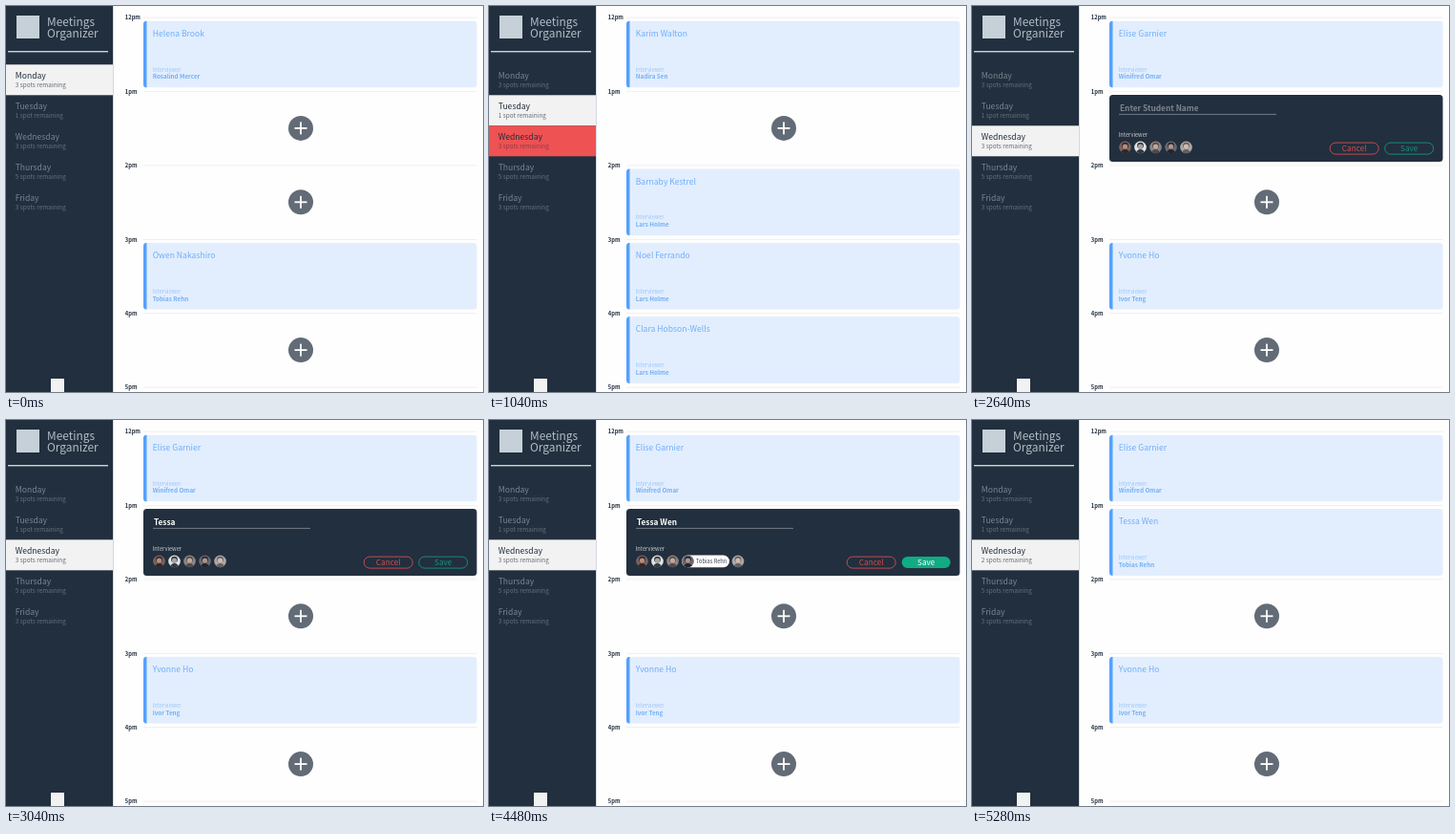
Write an HTML page with a canvas that moves like this. It is 500 px wide and 404 px high and loops after 5840 ms.

```html
<!DOCTYPE html>
<html lang="en">
<head>
<meta charset="utf-8">
<title>Booking schedule</title>
<style>
  html, body { margin: 0; width: 100%; height: 100%; overflow: hidden; background: #fefefe; }
  canvas { display: block; width: 500px; height: 404px; }
</style>
</head>
<body>
<canvas id="stage" width="500" height="404"></canvas>
<script>
const ctx = document.getElementById('stage').getContext('2d');
const LOOP = 5840;
const FONT = '"Noto Sans CJK JP", "Noto Sans CJK SC", "Noto Sans CJK", "Open Sans", sans-serif';
const NAVY = '#222f3e', BLUE = '#54a0ff', RED = '#ee5253', GREEN = '#10ac84';
const ROW = 77.4;

// Times at which the interface changes state.
const AT = {
  hoverTue: 560, openTue: 960, hoverWed: 1040, openWed: 1520,
  hoverAdd: 1920, form: 2320, type: 2640, typed: 3280,
  pick: 4080, hoverSave: 4480, saving: 4640, saved: 5280
};

const DAYS = ['Monday', 'Tuesday', 'Wednesday', 'Thursday', 'Friday'];
const SPOTS = [3, 1, 3, 5, 3];
const HOURS = ['12pm', '1pm', '2pm', '3pm', '4pm', '5pm'];
const STUDENT = 'Tessa Wen', PICKED = 'Tobias Rehn';

// Bookings per day: one [student, interviewer] pair or null per hour.
const BOOKINGS = [
  [['Helena Brook', 'Rosalind Mercer'], null, null, ['Owen Nakashiro', PICKED], null],
  [['Karim Walton', 'Nadira Sen'], null, ['Barnaby Kestrel', 'Lars Holme'],
   ['Noel Ferrando', 'Lars Holme'], ['Clara Hobson-Wells', 'Lars Holme']],
  [['Elise Garnier', 'Winifred Omar'], null, null, ['Yvonne Ho', 'Ivor Teng'], null]
];

// Avatar tones: background, hair and shoulders, skin.
const AVATARS = [
  ['#77635f', '#30262a', '#b78d7b'],
  ['#e4e4e4', '#313a42', '#a9a4a2'],
  ['#8d8580', '#4b4a50', '#c5a797'],
  ['#6a6970', '#20252e', '#b49389'],
  ['#aaa7a5', '#615f63', '#d1b9ae']
];

function text(str, x, y, size, color, weight = 400, align = 'left') {
  ctx.font = `${weight} ${size}px ${FONT}`;
  ctx.textAlign = align;
  ctx.fillStyle = color;
  ctx.fillText(str, x, y);
}

function rect(x, y, w, h, color) {
  ctx.fillStyle = color;
  ctx.fillRect(x, y, w, h);
}

function circle(x, y, r, color) {
  ctx.beginPath();
  ctx.arc(x, y, r, 0, Math.PI * 2);
  ctx.fillStyle = color;
  ctx.fill();
}

function roundPath(x, y, w, h, r) {
  ctx.beginPath();
  ctx.roundRect(x, y, w, h, r);
}

function drawSidebar(active, hovered, wedSpots) {
  rect(0, 0, 112, 404, NAVY);
  rect(112, 0, 1, 404, '#d3d9e1');
  rect(11, 10, 24, 24, '#c5d0d9');
  text('Meetings', 43, 21, 11.9, '#b4bdc5', 300);
  text('Organizer', 43, 33, 11.9, '#b4bdc5', 300);
  rect(2, 47, 105, 1.4, '#cdd2d7');

  DAYS.forEach((day, i) => {
    const y = 61.3 + i * 32;
    const spots = i === 2 ? wedSpots : SPOTS[i];
    const isActive = i === active, isHover = i === hovered && !isActive;
    if (isActive) rect(0, y, 112, 32, '#f2f2f2');
    if (isHover) rect(0, y, 112, 32, RED);
    const lit = isActive || isHover;
    text(day, 9.7, y + 14.8, 8.6, lit ? NAVY : '#7b858f');
    text(`${spots} spot${spots === 1 ? '' : 's'} remaining`, 9.7, y + 23.6, 6.45,
      isActive ? '#626b75' : isHover ? '#8c3c46' : '#66717c', 300);
  });
  rect(47, 390, 14, 14, '#f2f2f2');
}

function drawBooking(y, [student, interviewer]) {
  ctx.save();
  roundPath(144, y, 349.5, 70, 3.5);
  ctx.clip();
  rect(144, y, 350, 70, '#e2eefe');
  rect(144, y, 3.5, 70, BLUE);
  ctx.restore();
  text(student, 153.7, y + 16.2, 8.6, '#70adf8');
  text('Interviewer', 153.7, y + 53.1, 5.6, '#9cc5f9', 300);
  text(interviewer, 153.7, y + 60.8, 6.3, '#75aff6', 600);
}

function drawAdd(y, hovered) {
  const cx = 309, cy = y + 35;
  circle(cx, cy, 13, hovered ? NAVY : '#626b76');
  rect(cx - 6.5, cy - 0.9, 13, 1.8, '#fff');
  rect(cx - 0.9, cy - 6.5, 1.8, 13, '#fff');
}

function drawAvatar(x, y, [back, dark, skin]) {
  ctx.save();
  ctx.beginPath();
  ctx.arc(x, y, 6.3, 0, Math.PI * 2);
  ctx.clip();
  rect(x - 7, y - 7, 14, 14, back);
  circle(x, y - 1.8, 3.4, dark);
  circle(x, y - 0.8, 2.6, skin);
  circle(x, y + 7, 4.8, dark);
  ctx.restore();
}

function drawButton(label, x, y, color, filled) {
  roundPath(x, y, 51, 12, 6);
  if (filled) {
    ctx.fillStyle = color;
    ctx.fill();
  } else {
    ctx.strokeStyle = color;
    ctx.lineWidth = 0.9;
    ctx.stroke();
  }
  text(label, x + 25.5, y + 9, 8.2, filled ? '#fff' : color, 400, 'center');
}

function drawPanel(y) {
  roundPath(144, y, 349.5, 70, 3.5);
  ctx.fillStyle = NAVY;
  ctx.fill();
}

function drawForm(y, t) {
  drawPanel(y);
  const progress = Math.min(1, Math.max(0, (t - AT.type) / (AT.typed - AT.type)));
  const count = Math.round(Math.floor(progress * 8) / 8 * STUDENT.length);
  if (count) text(STUDENT.slice(0, count), 155, y + 17, 8.3, '#fff', 600);
  else text('Enter Student Name', 155, y + 17, 8.3, '#7d8690', 600);
  rect(154, y + 20, 165, 0.9, '#7a838d');
  text('Interviewer', 153.7, y + 44, 5.7, '#c6cbd0');

  const picked = t >= AT.pick;
  const cy = y + 55;
  if (picked) {
    roundPath(202, cy - 6.3, 50, 12.6, 6.3);
    ctx.fillStyle = '#fff';
    ctx.fill();
    text(PICKED, 217, cy + 2.2, 5.7, '#39434f');
  }
  AVATARS.forEach((tones, i) => {
    drawAvatar(160.5 + i * 16 + (picked && i === 4 ? 36.5 : 0), cy, tones);
  });
  drawButton('Cancel', 375.2, y + 50.2, '#d34e51', false);
  const save = t >= AT.hoverSave;
  drawButton('Save', 432.7, y + 50.2, save ? GREEN : '#13967a', save);
}

function drawSaving(y, t) {
  drawPanel(y);
  const angle = (t - AT.saving) / 1000 * Math.PI * 2;
  ctx.beginPath();
  ctx.arc(319, y + 27, 10, angle, angle + Math.PI * 1.5);
  ctx.strokeStyle = '#fff';
  ctx.lineWidth = 2;
  ctx.stroke();
  text('Saving', 319, y + 55, 9, '#fff', 600, 'center');
}

function drawSlot(hour, day, t) {
  const y = 15.5 + hour * ROW;
  const booking = BOOKINGS[day][hour];
  const editing = day === 2 && hour === 1;
  if (booking) drawBooking(y, booking);
  else if (editing && t >= AT.saved) drawBooking(y, [STUDENT, PICKED]);
  else if (editing && t >= AT.saving) drawSaving(y, t);
  else if (editing && t >= AT.form) drawForm(y, t);
  else drawAdd(y, editing && t >= AT.hoverAdd);
}

function draw(t) {
  const day = t >= AT.openWed ? 2 : t >= AT.openTue ? 1 : 0;
  const hovered = t >= AT.hoverWed ? 2 : t >= AT.hoverTue ? 1 : -1;
  rect(0, 0, 500, 404, '#fefefe');
  drawSidebar(day, hovered, t >= AT.saved ? 2 : 3);
  HOURS.forEach((label, i) => {
    text(label, 124.8, 14.4 + i * ROW, 5.8, NAVY, 700);
    rect(144, 11.7 + i * ROW, 349.5, 0.8, '#ececee');
    if (i < 5) drawSlot(i, day, t);
  });
}

const start = performance.now();
function frame() {
  draw((performance.now() - start) % LOOP);
  requestAnimationFrame(frame);
}
frame();
</script>
</body>
</html>
```
